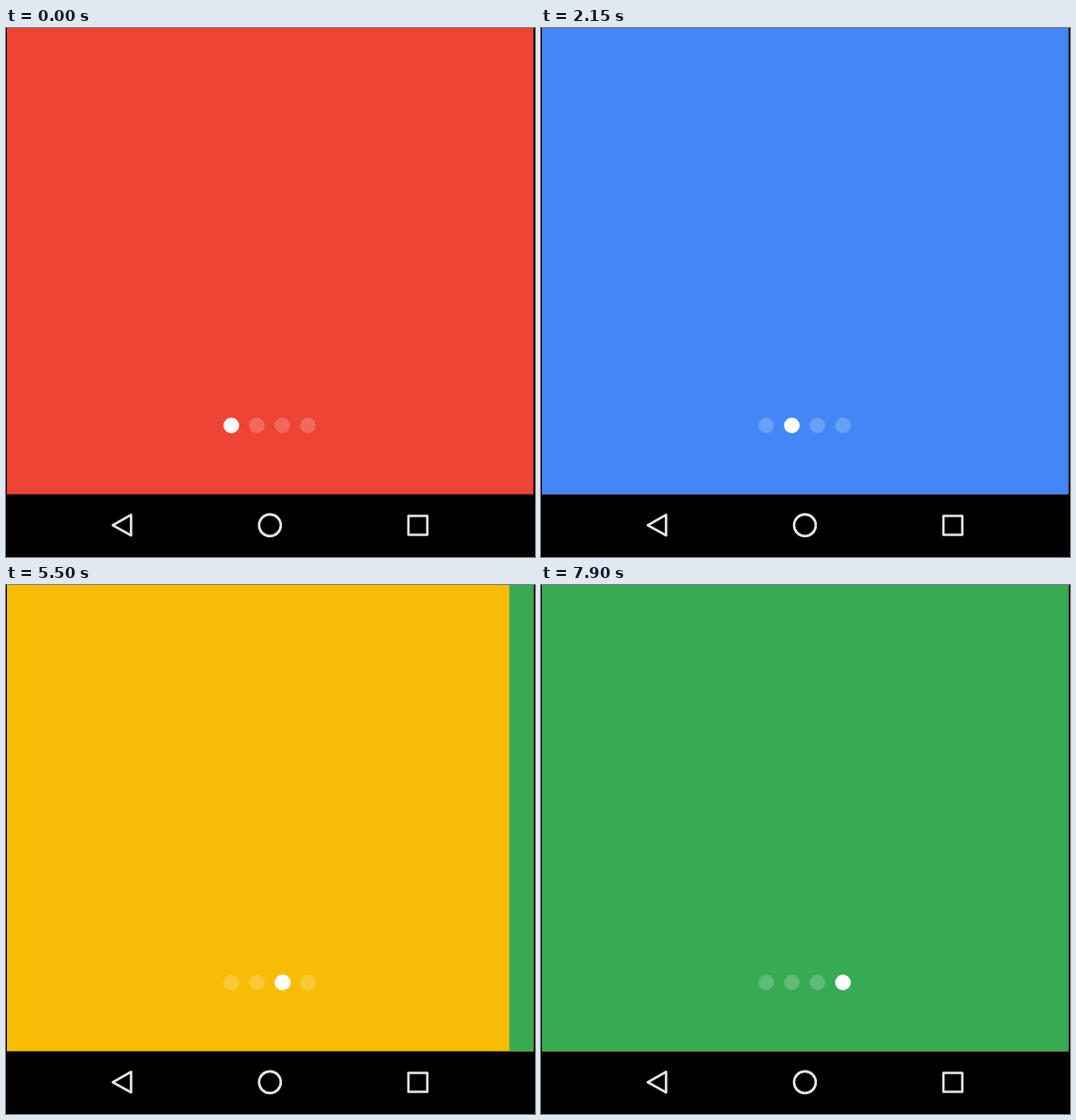
Animation of 560x560 px, one loop 8.05 s. Source, as an HTML page:

```html
<!DOCTYPE html>
<html lang="en">
<head>
<meta charset="utf-8">
<title>Page indicator</title>
<style>
html, body { margin: 0; width: 100%; height: 100%; overflow: hidden; background: #000; }
svg { display: block; width: 100vw; height: 100vh; }
</style>
</head>
<body>
<svg viewBox="0 0 560 560">
  <rect width="560" height="560"/>
  <rect id="page" x="1" y="-1" width="557.4" height="494.6"/>
  <rect id="next" y="-1" height="494.6"/>
  <g id="dots" fill="#fff" fill-opacity=".2"></g>
  <rect id="worm" y="412.5" height="16.5" rx="8.25" fill="#fff"/>
  <g fill="none" stroke="#e6e6e6" stroke-width="2.6" stroke-linejoin="round">
    <path d="M113 526.3 132.4 515.4V537.2Z"/>
    <circle cx="279.4" cy="526.4" r="11.5"/>
    <rect x="426" y="516.5" width="20" height="20"/>
  </g>
</svg>
<script>
const LOOP = 8050, STEP = 50;
const LEFT = 1, WIDTH = 557.4, DOT_X = 238.5, GAP = 27.05, R = 8.25;
const COLORS = ['#ed4436', '#4387f7', '#f9bc06', '#37aa54'];
// Each swipe: drag start, release time, progress at release, settle end
const SWIPES = [
  [1185, 1650, .555, 2273],
  [3335, 3836, .304, 4376],
  [5455, 5815, .369, 6420]
];
const el = id => document.getElementById(id);
const set = (node, attrs) => {
  for (const k in attrs) node.setAttribute(k, attrs[k]);
};
const clamp = v => Math.min(1, Math.max(0, v));
const ease = v => (1 - Math.cos(Math.PI * clamp(v))) / 2;

function progress(t, [start, release, reached, end]) {
  if (t < release) return reached * clamp((t - start) / (release - start));
  return 1 - (1 - reached) * clamp((end - t) / (end - release)) ** 5;
}

el('dots').innerHTML = COLORS.map((_, i) =>
  `<circle cx="${DOT_X + i * GAP}" cy="420.75" r="${R}"/>`).join('');

function draw() {
  const now = performance.now() % LOOP;
  const t = Math.floor((now + 4) / STEP) * STEP;
  const pos = SWIPES.reduce((sum, s) => sum + progress(t, s), 0);
  const index = Math.min(2, Math.floor(pos)), p = pos - index;
  set(el('page'), { fill: COLORS[index] });
  set(el('next'), { fill: COLORS[index + 1], x: LEFT + WIDTH * (1 - p), width: WIDTH * p });

  // The head stretches in the first half, the tail follows in the second
  const head = ease(p * 2), tail = ease(p * 2 - 1);
  set(el('worm'), {
    x: DOT_X - R + (index + tail) * GAP,
    width: 2 * R + (head - tail) * GAP
  });
  requestAnimationFrame(draw);
}
draw();
</script>
</body>
</html>
```
